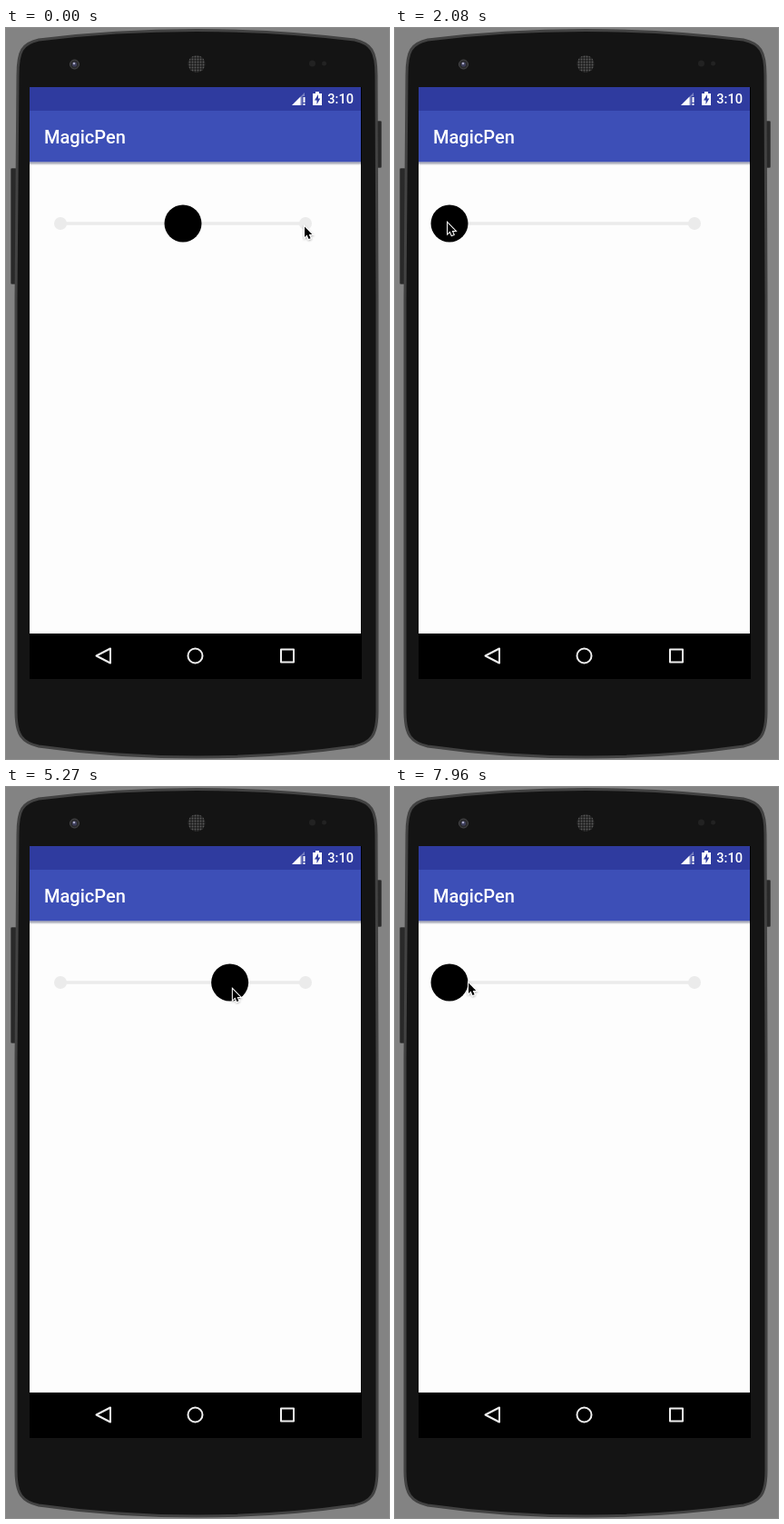
Animation, 422 px wide and 804 px high, one loop 8000 ms. Source, as an HTML page:

```html
<!DOCTYPE html>
<html lang="en">
<head>
<meta charset="utf-8">
<title>Slider demo</title>
<style>
  html, body { margin: 0; width: 100%; height: 100%; overflow: hidden; background: #838383; }
  svg { display: block; width: 422px; height: 804px; }
  text { font-family: Roboto, sans-serif; font-weight: 500; fill: #fff; }
</style>
</head>
<body>
<svg viewBox="0 0 422 804">
  <defs>
    <linearGradient id="shade" x2="0" y2="1">
      <stop stop-color="#8d8fa0"/><stop offset="1" stop-color="#fdfdfd"/>
    </linearGradient>
    <pattern id="mesh" width="3" height="3" patternUnits="userSpaceOnUse">
      <circle cx="1.5" cy="1.5" r=".95" fill="#5a5a5a"/>
    </pattern>
    <filter id="soft" x="-50%" y="-50%" width="200%" height="200%">
      <feDropShadow dx="0" dy="1" stdDeviation=".8" flood-opacity=".35"/>
    </filter>
  </defs>

  <!-- Phone body -->
  <g fill="#292929" stroke="#444" stroke-width="1">
    <rect x="5.5" y="154.500" width="6" height="127" rx="1"/>
    <rect x="408.500" y="102.500" width="5" height="51" rx="1"/>
  </g>
  <path fill="#141414" stroke="#424242" stroke-width="3"
    d="M13 52C13 25 18 17 36 13Q120 2.500 210 2.500T384 13C402 17 408 25 408 52L409 300V752C409 778 402 786 384 790Q300 802 210 802T36 790C18 786 11 778 11 752V300Z"/>
  <circle cx="75.500" cy="40" r="5" fill="#2b2b2d" stroke="#48484a"/>
  <circle cx="75.500" cy="40" r="2.600" fill="#3c3d59"/>
  <circle cx="75" cy="39" r="1.300" fill="#a9a9c4"/>
  <circle cx="210" cy="39.500" r="9.500" fill="#202020"/>
  <circle cx="210" cy="39.500" r="9.500" fill="url(#mesh)"/>
  <g fill="#222"><circle cx="337.500" cy="39" r="3.500"/><circle cx="350.500" cy="39" r="2.500"/></g>

  <!-- Screen -->
  <path d="M26 65H392V716H26z"/>
  <path fill="#fdfdfd" d="M26 147H391V666H26z"/>
  <path fill="#2f3b9f" d="M26 65H391V91H26z"/>
  <path fill="#3d4fb7" d="M26 91H391V147.500H26z"/>
  <rect x="26" y="147.500" width="365" height="3.500" fill="url(#shade)"/>
  <text x="42" y="126.500" font-size="20">MagicPen</text>
  <text x="354.300" y="83" font-size="14.600">3:10</text>
  <g fill="#fff">
    <path opacity=".35" d="M315 85L329 71V75H326.500V85z"/>
    <path d="M315 85L324.500 75.500V85zM327.500 76H329.500V82H327.500zM327.500 83H329.500V85H327.500z"/>
    <path d="M338 72H341V70H345V72H348V85H338z"/>
  </g>
  <path fill="#2f3b9f" d="M344 73L340 79.500H342.500V84L346.300 77.500H344z"/>
  <g fill="none" stroke="#eee" stroke-width="2" stroke-linejoin="round">
    <path d="M99.500 690.500L115 682.500V698.500z"/>
    <circle cx="208.500" cy="690.500" r="8"/>
    <path d="M303 683.500H317V697.500H303z"/>
  </g>

  <!-- Slider -->
  <g fill="#ebebeb">
    <path d="M60 213.300H330V216.700H60z"/>
    <circle cx="60" cy="215" r="7"/><circle cx="330" cy="215" r="7"/>
  </g>
  <circle id="ball" cy="215" r="20.500"/>
  <path id="arrow" d="M2 2.500V14L4.600 11.600L6.500 16L8.600 15.200L6.700 11H10.300z"
    stroke="#fff" stroke-width="2" paint-order="stroke" filter="url(#soft)"/>
</svg>
<script>
const LOOP = 8000;
const ball = document.getElementById("ball"), arrow = document.getElementById("arrow");
const smooth = p => (1 - Math.cos(Math.PI * p)) / 2;
const out = k => p => 1 - (1 - p) ** k;

// Each move: first and last change in ms, number of steps, then what it changes
const moves = [
  { from: 110, to: 380, n: 5, ball: 330 },
  { from: 620, to: 1370, n: 14, x: 58, y: 212, lift: 9 },
  { from: 1430, to: 1430, n: 1, x: 56, y: 212 },
  { from: 1790, to: 2080, n: 6, ball: 60 },
  { from: 2980, to: 3730, n: 14, ball: 172.5, ballEase: out(.93), x: 172, y: 219, ease: out(1.43) },
  { from: 3790, to: 4380, n: 11, ball: 195, x: 173, y: 220 },
  { from: 4560, to: 4680, n: 3, x: 191, y: 220 },
  { from: 4980, to: 5750, n: 14, ball: 287.5, ballEase: out(1.46), x: 283, y: 220, ease: out(1.72) },
  { from: 5870, to: 6450, n: 11, ball: 330, x: 317, y: 217 },
  { from: 6750, to: 7150, n: 8, ball: 112, ballEase: out(1.69), x: 99, y: 217, ease: out(2.12) },
  { from: 7380, to: 7960, n: 11, ball: 60, x: 79, y: 213 }
];

function progress(t, { from, to, n }) {
  if (t >= to) return 1;
  return (Math.floor((t - from) / (to - from) * (n - 1) + .15) + 1) / n;
}

function pose(t) {
  const s = { ball: 195, x: 327, y: 216 };
  for (const m of moves) {
    if (t < m.from) break;
    const p = progress(t, m);
    const blend = (key, q) => { if (key in m) s[key] += (m[key] - s[key]) * q; };
    blend("ball", (m.ballEase || smooth)(p));
    blend("x", (m.ease || smooth)(p));
    blend("y", p * p);
    s.y -= (m.lift || 0) * 4 * p * (1 - p);
  }
  return s;
}

function draw(now) {
  const s = pose(now % LOOP);
  ball.setAttribute("cx", s.ball);
  arrow.setAttribute("transform", `translate(${s.x} ${s.y})`);
  requestAnimationFrame(draw);
}
draw(performance.now());
</script>
</body>
</html>
```
